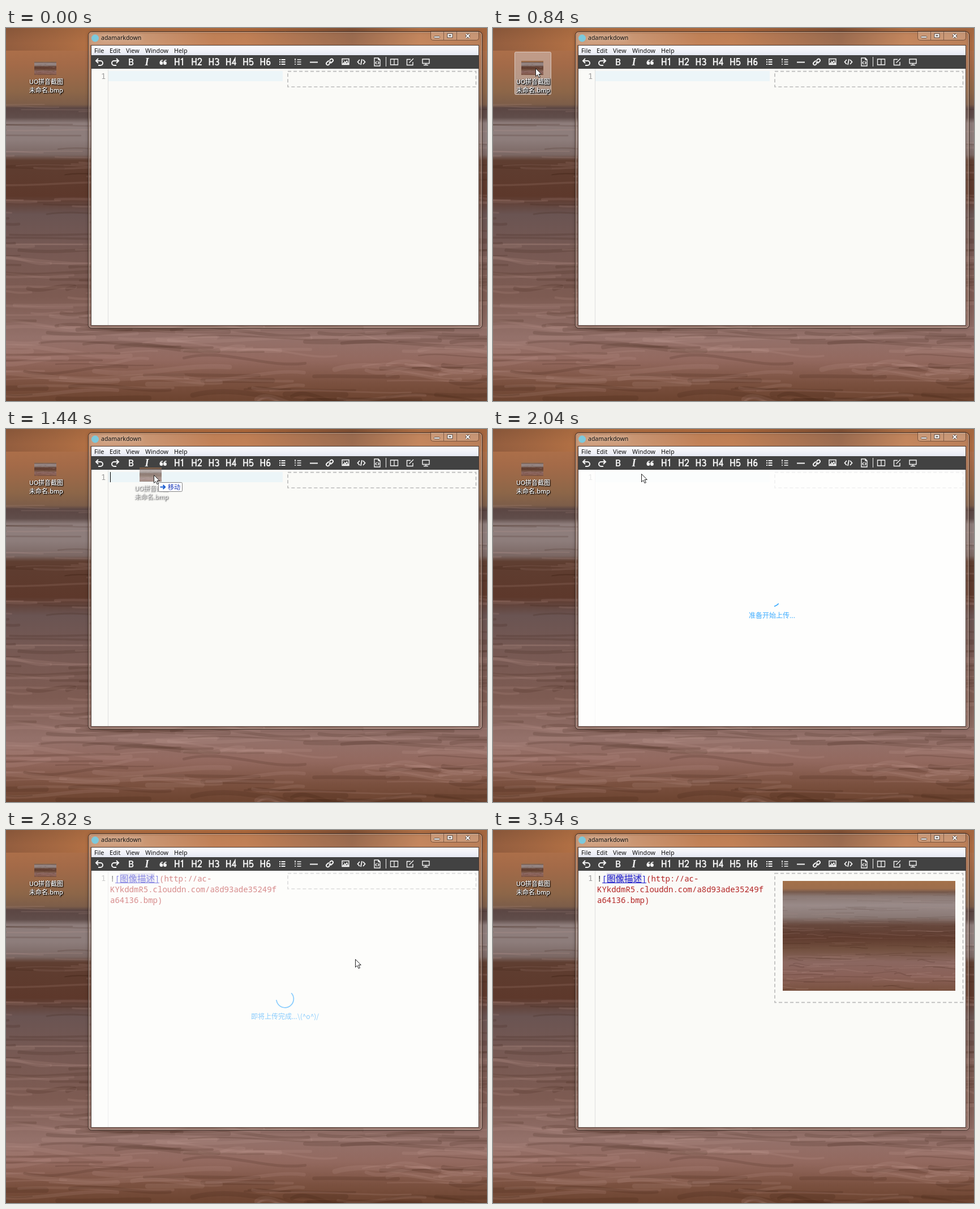
Animation, 850 px wide and 659 px high, one loop 4.8 s. Source, as an HTML page with a canvas:

```html
<!DOCTYPE html>
<html lang="en">
<head>
<meta charset="utf-8">
<title>Markdown editor: drop to upload</title>
<style>
html, body { margin: 0; width: 100%; height: 100%; overflow: hidden; }
canvas { display: block; width: 850px; height: 659px; }
</style>
</head>
<body>
<canvas id="stage" width="850" height="659"></canvas>
<script>
const W = 850, H = 659, LOOP = 4800, TICK = 60;
const DRAG = 1080, DROP = 1800, LOADING = 1870, NEAR_END = 2400, INSERT = 2700,
      FADE_OUT = 2735, GROW = 3240, BLANK_IMAGE = 3420, IMAGE = 3540;
const CJK = '"Noto Sans CJK SC", "Noto Sans CJK", sans-serif';
const UI = '"Noto Sans", ' + CJK;
const MONO = '"Noto Sans Mono", monospace';
const ctx = document.getElementById('stage').getContext('2d');

// ---------- helpers ----------
function bezier(x1, y1, x2, y2) {
  const at = (a, b, u) => 3 * a * u * (1 - u) ** 2 + 3 * b * u * u * (1 - u) + u ** 3;
  return x => {
    if (x <= 0) return 0;
    if (x >= 1) return 1;
    let lo = 0, hi = 1;
    for (let i = 0; i < 24; i++) {
      const mid = (lo + hi) / 2;
      if (at(x1, x2, mid) < x) lo = mid; else hi = mid;
    }
    return at(y1, y2, lo);
  };
}
const ease = bezier(.25, .1, .25, 1);
const easeInOut = bezier(.42, 0, .58, 1);

function random(seed) {
  return () => (seed = (seed * 16807) % 2147483647) / 2147483647;
}

function layer(w, h, paint) {
  const c = document.createElement('canvas');
  c.width = w;
  c.height = h;
  paint(c.getContext('2d'));
  return c;
}

function gradient(g, x0, y0, x1, y1, stops) {
  const fill = g.createLinearGradient(x0, y0, x1, y1);
  stops.forEach(([at, color]) => fill.addColorStop(at, color));
  return fill;
}

function rect(g, x, y, w, h, fill) {
  g.fillStyle = fill;
  g.fillRect(x, y, w, h);
}

function roundBox(g, x, y, w, h, r, fill, stroke) {
  g.beginPath();
  g.roundRect(x, y, w, h, r);
  if (fill) { g.fillStyle = fill; g.fill(); }
  if (stroke) { g.strokeStyle = stroke; g.stroke(); }
}

function text(g, str, x, y, font, color, align = 'left') {
  g.font = font;
  g.fillStyle = color;
  g.textAlign = align;
  g.fillText(str, x, y);
}

// ---------- sea scenery ----------
function sea(g, w, h, stops, horizon, count, seed) {
  const rnd = random(seed);
  rect(g, 0, 0, w, h, gradient(g, 0, 0, 0, h, stops));
  g.lineCap = 'round';
  for (let i = 0; i < count; i++) {
    const depth = rnd(), y = h * (horizon + (1 - horizon) * depth);
    const x = w * (rnd() * 1.2 - .2), len = w * (.08 + .25 * rnd());
    const bend = h * (.005 + .03 * depth) * (rnd() - .4);
    g.strokeStyle = rnd() < .5 ? 'rgba(205,170,160,.13)' : 'rgba(50,22,12,.15)';
    g.lineWidth = h * (.003 + .012 * depth * rnd());
    g.beginPath();
    g.moveTo(x, y);
    g.bezierCurveTo(x + len / 3, y - bend * 2, x + len * .66, y + bend * 2, x + len, y + bend);
    g.stroke();
  }
}

const wallpaper = layer(W, H, g => {
  sea(g, W, H, [
    [0, '#96613f'], [.04, '#b0714a'], [.1, '#a36a48'], [.17, '#8d6648'], [.205, '#7c5d49'],
    [.215, '#5b4643'], [.24, '#604d4a'], [.255, '#8e7d7b'], [.3, '#8d7d7b'], [.34, '#7b6763'],
    [.355, '#5f3e31'], [.45, '#5d382b'], [.5, '#6a5452'], [.6, '#775953'], [.72, '#7d5b52'],
    [.83, '#94716a'], [.89, '#93695f'], [.95, '#7b5140'], [1, '#6c432f']
  ], .205, 330, 77);
  rect(g, 0, 0, W, 40, gradient(g, 0, 0, W, 0, [
    [0, 'rgba(120,75,52,.5)'], [.2, 'rgba(190,118,66,.6)'], [.5, 'rgba(184,108,58,.7)'],
    [.72, 'rgba(120,74,48,.7)'], [.86, 'rgba(190,120,72,.7)'], [1, 'rgba(170,104,62,.6)']
  ]));
});

const photo = layer(305, 194, g => sea(g, 305, 194, [
  [0, '#a4714a'], [.07, '#9d6e4d'], [.1, '#775a4c'], [.14, '#8b7974'], [.22, '#998a88'],
  [.33, '#8a7975'], [.4, '#67483d'], [.52, '#5f3b2e'], [.62, '#72503f'], [.74, '#8b6760'],
  [.87, '#8a6158'], [1, '#79513f']
], .1, 170, 19));

// ---------- window ----------
const DIGITS = [
  'M0 3L3 1V13',
  'M0 4C0 -.5 6 -.5 6 4C6 6.5 3 8 .3 12H6.5',
  'M0 2.5C1 .3 6 .5 6 3.7C6 6 4 6.3 2 6.3C4 6.3 6.3 6.8 6.3 9.5C6.3 13 1 13 0 10.5',
  'M4.8 13V1L0 9.5H7',
  'M6 1H.8L.5 6.5C2 5 6.3 5 6.3 9C6.3 13 1 13 0 10.5',
  'M5.5 1.7C3 0 .5 2 .5 7V9C.5 13 6 13 6 9C6 5 1 5 .5 8.5'
];
// Stroked toolbar icons: centre x, line width, path around the centre
const ICONS = [
  [165, 2, 'M-2 -6L-6 -2L-2 2M-6 -2H2a4 4 0 0 1 0 8H-2'],
  [193, 2, 'M2 -6L6 -2L2 2M6 -2H-2a4 4 0 0 0 0 8H2'],
  [488, 2, 'M-5 -4h2M-1.5 -4h7M-5 0h2M-1.5 0h7M-5 4h2M-1.5 4h7'],
  [516, 1.6, 'M-5 -6v3.5M-6 0h2M-6 4h2M-1.5 -4h7M-1.5 0h7M-1.5 4h7'],
  [544, 2, 'M-7 .5h14'],
  [572, 2, 'M-1 2L2 -1M0 -3L2 -5a2.6 2.6 0 0 1 3.6 3.6L3 1.2A2.5 2.5 0 0 1 0 1.2'
    + 'M0 3L-2 5a2.6 2.6 0 0 1 -3.6 -3.6L-3 -1.2A2.5 2.5 0 0 1 0 -1.2'],
  [600, 1.5, 'M-6 -5.5h12v10h-12zM-4 3L-1.5 -.5L0 1.5L2.5 -2L4.5 3zM-3.5 -3h1'],
  [628, 1.8, 'M-3 -4L-6.5 0L-3 4M3 -4L6.5 0L3 4M1 -5L-1 5'],
  [656, 1.4, 'M-5 -7h7l3 3v11h-10zM2 -7v3h3M-1 -1L-3 1.5L-1 4M1 -1L3 1.5L1 4'],
  [671.5, 1, 'M0 -9V8'],
  [686, 1.3, 'M-6.5 -5h13v10h-13zM0 -5v10'],
  [714, 1.4, 'M1 -4.5h-6.5v10h10.5V0M-1.5 1.5L6 -6'],
  [742, 1.4, 'M-6 -5h12v7.5h-12zM0 2.5v3M-4 5.5h8']
];

function strokePath(g, x, y, width, d) {
  g.save();
  g.translate(x, y);
  g.lineWidth = width;
  g.stroke(new Path2D(d));
  g.restore();
}

function toolbar(g) {
  rect(g, 151, 48, 684, 24, '#424242');
  g.strokeStyle = '#f4f4f4';
  ICONS.forEach(([x, width, d]) => strokePath(g, x, 60, width, d));
  DIGITS.forEach((d, i) => {
    const x = 298 + i * 30.3;
    strokePath(g, x, 53, 2, 'M1 0V13M7.5 0V13M1 6.5H7.5');
    strokePath(g, x + 11, 53, 1.9, d);
  });
  text(g, 'B', 221, 66, '500 16px Roboto, sans-serif', '#f4f4f4', 'center');
  text(g, 'I', 249, 66, 'italic bold 18px "Liberation Serif", serif', '#f4f4f4', 'center');
  for (const x of [274.5, 281]) {
    g.beginPath();
    g.arc(x, 62, 2.9, 0, 7);
    g.fill();
    strokePath(g, x, 60, 1.6, 'M-2.2 2C-2.2 -1.5 0 -3 2.5 -3.2');
  }
}

function windowButtons(g) {
  roundBox(g, 750.5, 5.5, 85, 16, [0, 0, 4, 4], 'rgba(255,235,220,.22)', 'rgba(60,35,25,.55)');
  rect(g, 773, 6, 1, 15, 'rgba(60,35,25,.5)');
  rect(g, 796, 6, 1, 15, 'rgba(60,35,25,.5)');
  roundBox(g, 756.5, 14.5, 10, 3, 1, '#fff', '#51443e');
  g.lineWidth = 4;
  g.strokeStyle = '#51443e';
  g.strokeRect(781.5, 11.5, 6, 4);
  g.lineWidth = 2;
  g.strokeStyle = '#fff';
  g.strokeRect(781.5, 11.5, 6, 4);
  const cross = 'M-3 -3L3 3M3 -3L-3 3';
  g.strokeStyle = '#51443e';
  strokePath(g, 816, 14, 4, cross);
  g.strokeStyle = '#fff';
  strokePath(g, 816, 14, 2, cross);
}

const scene = layer(W, H, g => {
  g.drawImage(wallpaper, 0, 0);
  desktopIcon(g);
  g.lineWidth = 1;
  g.save();
  g.shadowColor = 'rgba(20,8,4,.6)';
  g.shadowBlur = 5;
  roundBox(g, 145.5, 6.5, 696, 524, 6, null, '#3c2a23');
  g.restore();
  roundBox(g, 146.5, 7.5, 694, 522, 5, 'rgba(255,225,205,.16)', 'rgba(255,235,220,.5)');
  rect(g, 148, 9, 220, 21, gradient(g, 148, 0, 368, 0,
    [[0, 'rgba(230,215,205,.3)'], [.4, 'rgba(230,215,205,.25)'], [1, 'rgba(230,215,205,0)']]));
  g.strokeStyle = '#4b3a33';
  g.strokeRect(150.5, 30.5, 685, 495);
  g.fillStyle = '#7cc9dc';
  g.beginPath();
  g.arc(157.5, 18, 6.5, 0, 7);
  g.fill();
  g.save();
  g.shadowColor = 'rgba(255,245,235,.8)';
  g.shadowBlur = 7;
  text(g, 'adamarkdown', 168, 21, '10.5px ' + UI, '#111');
  g.restore();
  windowButtons(g);

  rect(g, 151, 31, 684, 17, gradient(g, 0, 31, 0, 48, [[0, '#fbfbfd'], [.5, '#f1f2f8'], [1, '#e6e9f3']]));
  [['File', 156], ['Edit', 183], ['View', 212], ['Window', 246], ['Help', 297]]
    .forEach(([label, x]) => text(g, label, x, 44, '10.8px ' + UI, '#111'));
  toolbar(g);
  rect(g, 151, 72, 684, 453, '#fafaf7');
  rect(g, 180, 72, 1, 453, '#dedede');
  text(g, '1', 176.5, 90, '14px ' + MONO, '#999', 'right');
});

// ---------- moving parts ----------
function desktopIcon(g, shadow = '#000') {
  g.drawImage(photo, 50, 58, 39, 25);
  g.save();
  g.shadowColor = shadow;
  g.shadowBlur = 2;
  g.shadowOffsetX = g.shadowOffsetY = 1;
  for (let pass = 0; pass < 2; pass++) {
    text(g, 'UO拼音截图', 71, 99, '11px ' + CJK, '#fff', 'center');
    text(g, '未命名.bmp', 71, 114, '11px ' + CJK, '#fff', 'center');
  }
  g.restore();
}

// Pointer path: time, x, y
const POINTER = [
  [120, 790, 227], [480, 12, 100], [600, 77, 83], [840, 75, 71], [1020, 75, 71],
  [1260, 168, 97], [1440, 261, 81], [1560, 262, 79], [2280, 262, 79],
  [2820, 617, 228], [3360, 841, 240]
];

function pointerAt(t) {
  const i = POINTER.findIndex(key => key[0] > t);
  if (i < 0) return POINTER[POINTER.length - 1].slice(1);
  const [t0, x0, y0] = POINTER[i - 1], [t1, x1, y1] = POINTER[i];
  const p = (t - t0) / (t1 - t0);
  return [Math.round(x0 + (x1 - x0) * p), Math.round(y0 + (y1 - y0) * p)];
}

const ARROW = new Path2D('M.5 .5V14.5L3.7 11.5L6 16.6L8.3 15.6L6 10.5H10.3Z');

function drawPointer(x, y) {
  ctx.save();
  ctx.translate(x, y);
  ctx.fillStyle = '#fff';
  ctx.strokeStyle = '#222';
  ctx.lineWidth = 1;
  ctx.fill(ARROW);
  ctx.stroke(ARROW);
  ctx.restore();
}

function drawGhost(x, y) {
  ctx.save();
  ctx.globalAlpha = .65;
  ctx.translate(x - 75, y - 71);
  desktopIcon(ctx, '#444');
  ctx.restore();
}

function drawMoveTip(x, y) {
  ctx.lineWidth = 1;
  roundBox(ctx, x + 8.5, y + 13.5, 42, 16, 2, '#fdfdff', '#858585');
  ctx.strokeStyle = '#1d5fd0';
  strokePath(ctx, x + 16, y + 21.5, 2.2, 'M-4.5 0H4M.5 -3.5L4 0L.5 3.5');
  text(ctx, '移动', x + 25, y + 25.5, '11px ' + CJK, '#1636b8');
}

function drawMarkdown() {
  const font = '14px ' + MONO, link = '#2222cc', url = '#b32424';
  rect(ctx, 201, 76, 62, 18, '#d9d7ea');
  text(ctx, '!', 184, 91, font, '#222');
  text(ctx, '[', 192.5, 91, font, link);
  text(ctx, '图像描述', 201, 91.5, '15.5px ' + CJK, link);
  text(ctx, ']', 263, 91, font, link);
  rect(ctx, 193, 93, 78, 1, link);
  text(ctx, '(http://ac-', 271, 91, font, url);
  text(ctx, 'KYkddmR5.clouddn.com/a8d93ade35249f', 184, 110, font, url);
  text(ctx, 'a64136.bmp)', 184, 129, font, url);
}

function drawPreview(t) {
  ctx.save();
  ctx.strokeStyle = '#bcbcbc';
  ctx.lineWidth = 1.7;
  ctx.setLineDash([6, 4]);
  ctx.strokeRect(498, 76.7, 332.5, t < GROW ? 27.3 : 228);
  ctx.restore();
  if (t >= IMAGE) ctx.drawImage(photo, 512, 90);
  else if (t >= BLANK_IMAGE) rect(ctx, 512, 90, 305, 194, '#fff');
}

function drawLoader(t) {
  const opacity = ease((t - LOADING) / 300) * (1 - ease((t - FADE_OUT) / 300));
  if (opacity <= 0) return;
  const age = t - LOADING, phase = age % 1500 / 750;
  const grow = easeInOut(phase), slide = easeInOut(phase - 1);
  // Arc lengths are in units of a circle with radius 20
  const from = (40 * grow + 80 * slide) / 20;
  const to = Math.min(from + (1 + 89 * grow) / 20, Math.PI * 2);
  const turn = age / 2000 * Math.PI * 2;
  ctx.save();
  ctx.globalAlpha = opacity;
  rect(ctx, 151, 72, 684, 453, 'rgba(255,255,255,.9)');
  ctx.strokeStyle = '#20a0ff';
  ctx.lineWidth = 1.7;
  ctx.lineCap = 'round';
  ctx.beginPath();
  ctx.arc(493, 298.5, 15.3, turn + from, turn + to);
  ctx.stroke();
  const label = t < NEAR_END ? '准备开始上传...' : '即将上传完成...\\(^o^)/';
  text(ctx, label, 493, 334, '12px ' + CJK, '#20a0ff', 'center');
  ctx.restore();
}

function draw(t) {
  ctx.drawImage(scene, 0, 0);
  const visible = t >= POINTER[0][0] && t < BLANK_IMAGE;
  const [x, y] = visible ? pointerAt(t) : [0, 0];
  const dragging = t >= DRAG && t < DROP;

  if (t < DRAG && x > 38 && x < 103 && y > 42 && y < 118) {
    ctx.lineWidth = 1;
    roundBox(ctx, 38.5, 42.5, 64, 75, 2, 'rgba(225,220,225,.42)', 'rgba(240,235,235,.65)');
    desktopIcon(ctx);
  }
  if (t < INSERT) rect(ctx, 181, 76, 308, 18, '#ecf5f8');
  else drawMarkdown();
  drawPreview(t);
  drawLoader(t);
  if (dragging) {
    if (x > 181) rect(ctx, 184, 76, 1, 18, '#000');
    drawGhost(x, y);
    if (x > 145) drawMoveTip(x, y);
  }
  if (visible) drawPointer(x, y);
}

const start = performance.now();
function frame() {
  const t = (performance.now() - start) % LOOP;
  draw(Math.floor(t / TICK) * TICK);
  requestAnimationFrame(frame);
}
frame();
</script>
</body>
</html>
```
